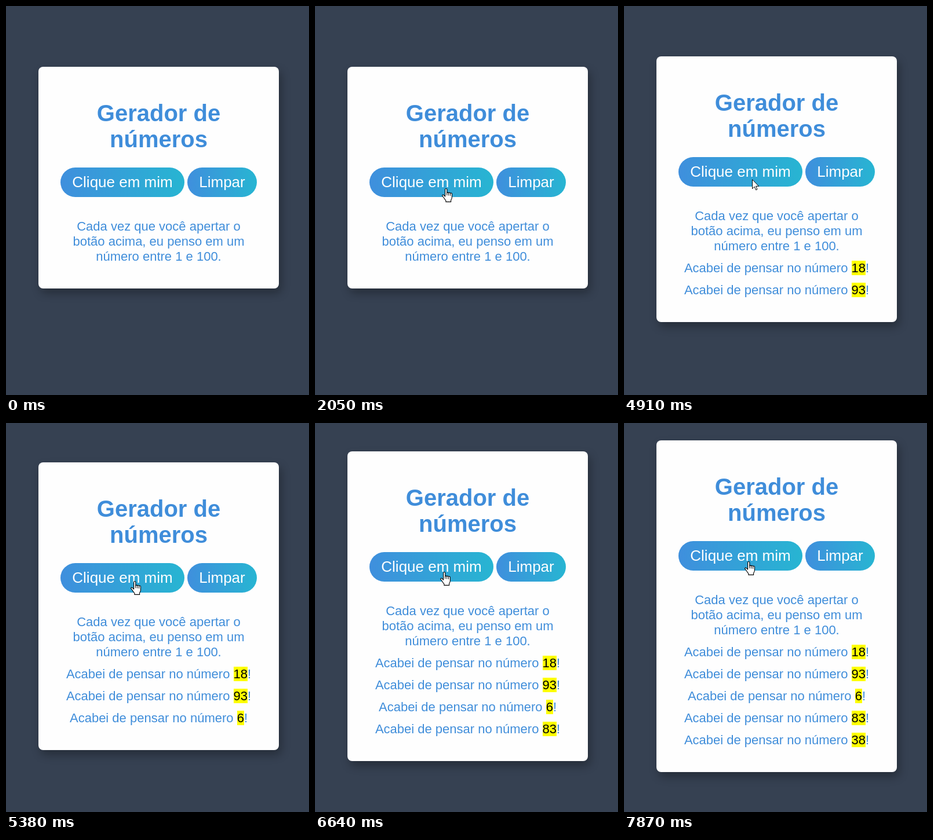
Write an HTML page that moves like this. It is 523 px wide and 672 px high and loops after 7990 ms.

```html
<!DOCTYPE html>
<html lang="pt-BR">
<head>
<meta charset="utf-8">
<title>Gerador de números</title>
<style>
  html, body { margin: 0; width: 100%; height: 100%; overflow: hidden; background: #364152; }
  body { position: relative; font-family: "Liberation Sans", Arial, sans-serif; cursor: default; }
  .card {
    position: absolute; left: 56px; width: 415px; box-sizing: border-box; padding: 30px 0;
    background: #fefefe; border-radius: 8px;
    box-shadow: 4px 8px 16px rgba(0, 0, 0, .3);
    color: #3f8dda; text-align: center; white-space: nowrap;
  }
  h1 { margin: 28px 0 26px; font-size: 40px; line-height: 45px; }
  p { margin: 0 0 12px; font-size: 22px; line-height: 26px; }
  mark { background: #ff0; color: #000; }
  .row { display: flex; justify-content: center; gap: 5px; margin-bottom: 38px; }
  .btn {
    box-sizing: border-box; padding: 10px 0; border-radius: 30px;
    color: #fff; font-size: 26px; line-height: 31px;
    background: linear-gradient(to right, #3f8fdd, #27b5d2);
  }
  svg { position: absolute; left: 0; top: 0; overflow: visible; }
  svg path { fill: #fff; stroke: #000; stroke-linejoin: round; }
</style>
</head>
<body>
<div class="card" id="card">
  <h1>Gerador de<br>números</h1>
  <div class="row">
    <div class="btn" style="width:214px">Clique em mim</div>
    <div class="btn" style="width:120px">Limpar</div>
  </div>
  <p>Cada vez que você apertar o<br>botão acima, eu penso em um<br>número entre 1 e 100.</p>
</div>
<svg id="pointer" width="20" height="26">
  <path id="arrow" d="M.5 .8V16.6L4.2 13.2L6.7 18.8L9 17.8L6.6 12.3H11.7Z"/>
  <g id="hand" transform="translate(-6 0)">
    <path stroke-width="1.1" d="M5.6 14V2.1a1.6 1.6 0 0 1 3.2 0V8.2a1.5 1.5 0 0 1 2.9 .2a1.5 1.5 0 0 1 2.9 .7a1.4 1.4 0 0 1 2.8 .9V15.4Q17.3 18 15.6 20.4V23.4H6.9V21.2Q4.6 18.6 3.3 16L.9 13.2C0 11.6 1.8 10.5 3.2 11.7Z"/>
    <path d="M8.8 8V12.2M11.7 8.5V12.5M14.6 9.2V12.8" style="fill:none"/>
  </g>
</svg>
<script>
const LOOP = 7990;
const clicks = [
  { at: 2560, pick: 18 }, { at: 3710, pick: 93 }, { at: 4910, pick: 6 },
  { at: 5860, pick: 83 }, { at: 6870, pick: 38 }
];

// The pointer enters at the right edge, then glides: begin, end, x, y
const entry = { x: 523, y: 450 };
const glides = [
  [1250, 2050, 225, 315],
  [4370, 4510, 221, 299],
  [4930, 5720, 221, 267],
  [5970, 6640, 222, 257],
  [6890, 7150, 228, 258],
  [7600, 7870, 214, 239]
];

const $ = id => document.getElementById(id);
const card = $('card'), pointer = $('pointer'), arrow = $('arrow'), hand = $('hand');
const show = (el, on) => { el.style.display = on ? '' : 'none'; };
const easeOut = k => k * (2 - k);

const items = clicks.map(({ pick }) => {
  const p = document.createElement('p');
  p.innerHTML = `Acabei de pensar no número <mark>${pick}</mark>!`;
  return card.appendChild(p);
});

function pointerAt(t) {
  let { x, y } = entry;
  for (const [begin, end, toX, toY] of glides) {
    if (t < begin) break;
    const k = easeOut(Math.min(1, (t - begin) / (end - begin)));
    x += (toX - x) * k;
    y += (toY - y) * k;
  }
  return [Math.round(x), Math.round(y)];
}

function draw(t) {
  const count = clicks.filter(c => t >= c.at + 20).length;
  items.forEach((el, i) => show(el, i < count));

  // The card grows with each line and stays centred once it is tall enough
  const height = 383 + 38 * count;
  const top = Math.min(105, 316.5 - height / 2);
  card.style.top = top + 'px';

  const [x, y] = pointerAt(t);
  const buttonTop = top + 174;
  const over = x >= 94 && x < 308 && y >= buttonTop && y < buttonTop + 51;
  const pressed = clicks.some(c => t >= c.at && t < c.at + 100);
  const isHand = over && !pressed;
  show(pointer, t >= glides[0][0]);
  pointer.style.transform = `translate(${x}px, ${y}px)`;
  show(hand, isHand);
  show(arrow, !isHand);
}

const start = performance.now();
function tick() {
  draw((performance.now() - start) % LOOP);
  requestAnimationFrame(tick);
}
tick();
</script>
</body>
</html>
```
